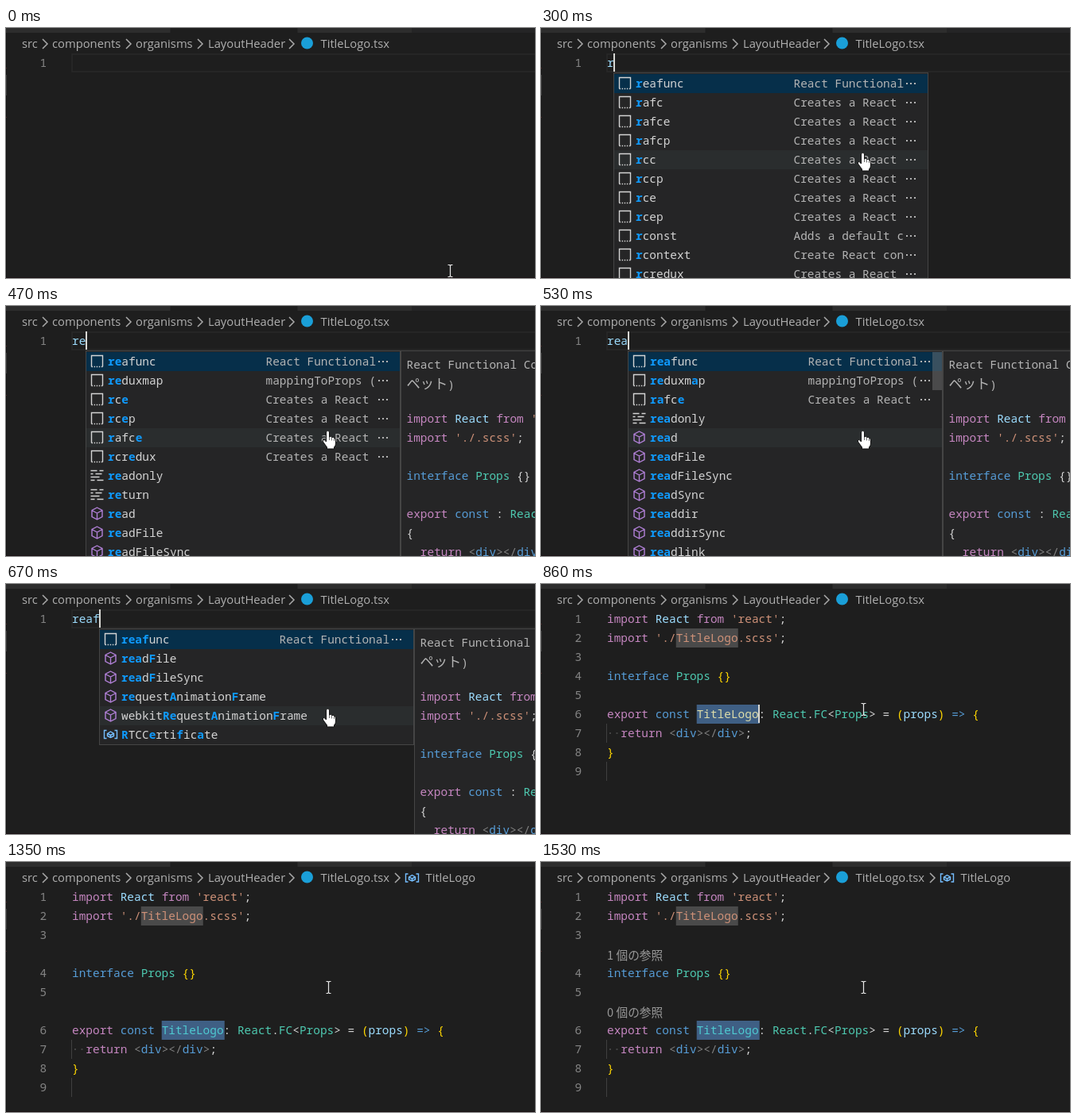
An HTML page that plays this animation: 665x315 px, repeating every 1840 ms.

```html
<!DOCTYPE html>
<html lang="en">
<head>
<meta charset="utf-8">
<title>Snippet completion</title>
<style>
html, body { margin: 0; width: 100%; height: 100%; overflow: hidden; background: #1e1e1e; }
svg { display: block; width: 665px; height: 315px; }
text { white-space: pre; fill: #d4d4d4; }
.mono { font: 14.45px "Noto Sans Mono", "DejaVu Sans Mono", monospace; }
.crumb { font: 14.75px "Open Sans", "Noto Sans", sans-serif; fill: #b0b0b0; }
.jp { font: 14.7px "Noto Sans CJK JP", "Noto Sans CJK", sans-serif; fill: #999; }
.wide { font-size: 17.3px; fill: #b4b4b4; }
.num { fill: #858585; }
.detail { fill: #b4b4b4; }
.hit { fill: #0f9bff; font-weight: 700; }
.icon { fill: none; stroke-width: 1.4; }
</style>
</head>
<body>
<svg id="stage" viewBox="0 0 665 315"></svg>
<script>
const LOOP = 1840, CHAR = 8.67, LEFT = 83, ROW = 24;
const COLORS = { k: '#c586c0', v: '#9cdcfe', s: '#ce9178', b: '#569cd6', t: '#4ec9b0',
  f: '#dcdcaa', g: '#808080', y: '#ffd700', w: '#d4d4d4', n: '#4ec9d0' };

const esc = s => s.replace(/&/g, '&amp;').replace(/</g, '&lt;');
const rect = (x, y, w, h, fill, extra = '') =>
  `<rect x="${x}" y="${y}" width="${w}" height="${h}" fill="${fill}" ${extra}/>`;
const text = (x, y, cls, body) => `<text x="${x}" y="${y}" class="${cls}">${body}</text>`;
const at = (x, y, body) => `<g transform="translate(${x} ${y})">${body}</g>`;

// Coloured source line: "k:import |v:React" gives one span per part.
const code = (x, y, line) => text(x, y, 'mono', line.split('|').map(part =>
  `<tspan fill="${COLORS[part[0]]}">${esc(part.slice(2))}</tspan>`).join(''));

// Asterisks enclose the matched letters.
const label = s => s.split('*').map((part, i) =>
  i % 2 ? `<tspan class="hit">${part}</tspan>` : part).join('');

const ICONS = {
  snippet: '<path class="icon" stroke="#d4d4d4" d="M-7 7V-7H7V7"/>' +
    '<path class="icon" stroke="#d4d4d4" stroke-dasharray="1.5 1.6" d="M-7 7H7"/>',
  keyword: '<path class="icon" stroke="#d4d4d4" d="M-8-6H0M3-6H8M-8-2H-5M-2-2H6M-8 2H3M-8 6H-3M0 6H8"/>',
  method: '<path class="icon" stroke="#b180d7" d="M0-7.5L6.5-4V4L0 7.5L-6.5 4V-4ZM-6.5-4L0-.5L6.5-4M0-.5V7.5"/>',
  variable: '<path class="icon" stroke="#75beff" d="M-5-5H-8V5H-5M5-5H8V5H5M-4-1L0-3.5L4-1V2L0 4L-4 2ZM-4-1L0 1L4-1M0 1V4"/>'
};

const CREATES = 'Creates a React ', FUNCTIONAL = 'React Functional';
const snippets = (names, details = {}) => names.split(' ').map((name, i) =>
  ['snippet', name, details[i] || CREATES]);
const plain = (icon, names) => names.split(' ').map(name => [icon, name]);

const LISTS = {
  r: snippets('*r*eafunc *r*afc *r*afce *r*afcp *r*cc *r*ccp *r*ce *r*cep *r*const *r*context *r*credux',
    { 0: FUNCTIONAL, 8: 'Adds a default c', 9: 'Create React con' }),
  re: [...snippets('*re*afunc *re*duxmap *r*c*e* *r*c*e*p *r*afc*e* *r*cr*e*dux',
      { 0: FUNCTIONAL, 1: 'mappingToProps (' }),
    ...plain('keyword', '*re*adonly *re*turn'), ...plain('method', '*re*ad *re*adFile *re*adFileSync')],
  rea: [...snippets('*rea*func *re*duxm*a*p *ra*fc*e*', { 0: FUNCTIONAL, 1: 'mappingToProps (' }),
    ...plain('keyword', '*rea*donly'),
    ...plain('method', '*rea*d *rea*dFile *rea*dFileSync *rea*dSync *rea*ddir *rea*ddirSync *rea*dlink')],
  reaf: [...snippets('*reaf*unc', { 0: FUNCTIONAL }),
    ...plain('method', '*rea*d*F*ile *rea*d*F*ileSync *re*quest*A*nimation*F*rame webkit*Re*quest*A*nimation*F*rame'),
    ...plain('variable', '*R*TCC*e*rti*f*ic*a*te')]
};
const THUMB = { rea: 48 };

const chevron = x => `<path d="M${x - 3} 14l6 6l-6 6" fill="none" stroke="#a9a9a9" stroke-width="1.5"/>`;
const caret = x => rect(x, 32, 2, 23, '#d8d8d4');

function chrome(symbol) {
  const names = [[20, 'src'], [58, 'components'], [163, 'organisms'], [254, 'LayoutHeader'], [395.5, 'TitleLogo.tsx']];
  return rect(0, 0, 665, 315, '#1e1e1e') +
    rect(0, 0, 665, 6, '#252526') + rect(0, 0, 206, 6, '#2d2d2d') +
    rect(207, 0, 159, 6, '#1e1e1e') + rect(367, 0, 143, 6, '#2d2d2d') +
    rect(0, 6, 1, 309, '#141414') + rect(0, 59, 1, 26, '#383838') +
    rect(0, 50, 1, 1, '#4a2222') + rect(0, 112, 1, 1, '#4a2222') +
    rect(0, 314, 665, 1, '#1a1114') +
    names.map(([x, name]) => text(x, 25, 'crumb', name)).join('') +
    [49, 154, 244, 359].map(chevron).join('') +
    '<circle cx="378.5" cy="19" r="7.5" fill="#1a9fd8"/>' +
    (symbol ? chevron(492) + at(510.5, 20, ICONS.variable) + text(527.5, 25, 'crumb', 'TitleLogo') : '');
}

function details(x) {
  const tx = x + 7.5;
  return rect(x + .5, 56.5, 400, 300, '#252526', 'stroke="#454545"') +
    text(tx, 79, 'mono detail', 'React Functional Component') +
    text(tx, 104, 'jp wide', 'ペット<tspan class="mono">)</tspan>') +
    code(tx, 147, "k:import |v:React |k:from |s:'react'|w:;") +
    code(tx, 171, "k:import |s:'./.scss'|w:;") +
    code(tx, 219, 'b:interface |t:Props |w:{}') +
    code(tx, 267, 'k:export |b:const |w:: |t:React.FC') +
    code(tx, 291, 'w:{') +
    code(tx, 315, 'k:  return |g:<|b:div|g:></|b:div|g:>');
}

function popup(x, key, hover, withDetails) {
  const list = LISTS[key];
  const height = Math.min(list.length, 12) * ROW;
  const rows = list.map(([icon, name, detail], i) => {
    const y = 58 + i * ROW, mid = y + 12;
    const fill = i === 0 ? '#062f4a' : i === hover ? '#2a2d2e' : null;
    return (fill ? rect(x + 1, y, 394, ROW, fill) : '') +
      at(x + 14.5, mid - .5, ICONS[icon]) +
      text(x + 28, mid + 5, 'mono', label(name)) +
      (detail ? text(x + 226.5, mid + 5, 'mono detail', detail) +
        [368, 373, 378].map(d => rect(x + d, mid - 1, 2, 2, '#b4b4b4')).join('') : '');
  }).join('');
  return (withDetails ? details(x + 396) : '') +
    rect(x + .5, 56.5, 395, height + 2, '#252526', 'stroke="#454545"') + rows +
    (THUMB[key] ? rect(x + 383, 58, 12, THUMB[key], '#797979', 'fill-opacity=".45"') : '');
}

const HAND = '<path d="M-3 .5Q-1-2 1 .5V7Q3 5.5 4 7.5Q6 6.5 7 8.5Q9 8 9 11V15Q9 18 7 20V22H-2V20L-7 13Q-8 10-5.5 10.5L-3 13Z" ' +
  'fill="#fff" stroke="#111" stroke-width="1"/><path d="M1 7V11M4 8V11.5M7 9V12" stroke="#444" stroke-width=".8"/>';
const BEAM = '<path d="M-3-7.5H-1L0-6.5L1-7.5H3M0-6.5V6.5M-3 7.5H-1L0 6.5L1 7.5H3" fill="none" stroke="#e8e8e8" stroke-width="1.2"/>';

function typingScene(t) {
  const word = t < 230 ? '' : t < 410 ? 'r' : t < 530 ? 're' : t < 670 ? 'rea' : 'reaf';
  const listKey = t < 470 ? 'r' : word;
  const end = LEFT + word.length * CHAR;
  const open = t >= 290;

  // The pointer advances once per 60 ms.
  const step = t < 50 ? 0 : Math.min(1, (Math.floor((t - 50) / 60) + 1) / 5);
  const ease = 1 - (1 - step) ** 2;
  const mx = 558.5 - 153 * ease, my = 306 - 148 * ease;

  return chrome(false) + text(42.5, 49, 'mono num', '1') +
    rect(83, 33, 600, 22, 'none', 'stroke="#292929" stroke-width="1.6"') +
    code(LEFT, 49, 'v:' + word) + (word ? caret(Math.floor(end)) : '') +
    (open ? popup(Math.floor(end), listKey, 4, t >= 350) : '') +
    at(mx, my, open ? HAND : BEAM);
}

function codeScene(t) {
  const gap = t >= 1100;
  const nameColor = t < 990 ? 'f' : 'n';
  const lines = [
    "k:import |v:React |k:from |s:'react'|w:;",
    "k:import |s:'./TitleLogo.scss'|w:;",
    '',
    'b:interface |t:Props |y:{}',
    '',
    `k:export |b:const |${nameColor}:TitleLogo|w:: |t:React|w:.|t:FC|w:<|t:Props|w:> = |y:(|v:props|y:) |b:=> |y:{`,
    'k:  return |g:<|b:div|g:></|b:div|g:>|w:;',
    'y:}',
    ''
  ];
  const top = n => 32 + (n - 1 + (gap ? (n > 3) + (n > 5) : 0)) * ROW;
  const guide = n => rect(82, top(n), 1, ROW, '#404040');
  const lens = (n, count) => text(83, top(n) - 5, 'jp', `${count} 個の参照`);
  const fade = t < 1400 ? 0 : Math.min(1, (Math.floor((t - 1400) / 65) + 1) / 3);
  const nameX = LEFT + 13 * CHAR;

  return chrome(t >= 1230) +
    rect(LEFT + 10 * CHAR, top(2), 9 * CHAR, ROW, '#4a4a4a') +
    rect(nameX, top(6), 9 * CHAR + 1, ROW, '#3f5f84') +
    guide(7) + guide(9) +
    [87, 95.5].map(x => rect(x - 1, top(7) + 11, 2, 2, '#434343')).join('') +
    lines.map((line, i) => text(42.5, top(i + 1) + 17, 'mono num', i + 1) +
      (line ? code(LEFT, top(i + 1) + 17, line) : '')).join('') +
    (t < 1350 ? at(0, top(6) - 32, caret(Math.floor(nameX + 9 * CHAR))) : '') +
    (fade ? `<g opacity="${fade}">${lens(4, 1)}${lens(6, 0)}</g>` : '') +
    at(405.5, 158, BEAM);
}

const stage = document.getElementById('stage');
const start = performance.now();
let shown = '';

function frame() {
  const t = Math.max(0, performance.now() - start) % LOOP;
  const markup = t < 860 ? typingScene(t) : codeScene(t);
  if (markup !== shown) stage.innerHTML = shown = markup;
  requestAnimationFrame(frame);
}
frame();
</script>
</body>
</html>
```
